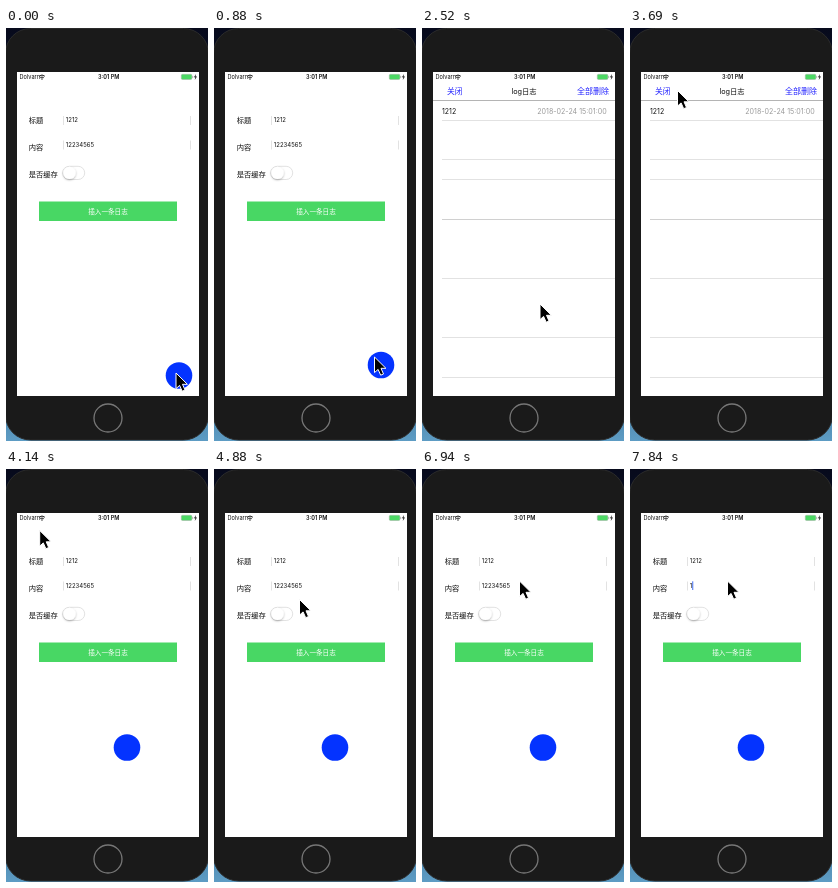
Write an HTML page that moves like this. It is 202x413 px and loops after 8000 ms.

```html
<!DOCTYPE html>
<html lang="zh">
<head>
<meta charset="utf-8">
<style>
  html, body { margin: 0; height: 100%; overflow: hidden; background: #1a1a1a; }
  svg { display: block; width: 202px; height: 413px; }
  text { font-family: Inter, "Noto Sans CJK SC", "Noto Sans CJK", sans-serif; fill: #111; }
  .status { font-size: 5.6px; }
  .label { font-size: 7.3px; }
  .value { font-size: 6px; }
  .link { fill: #2626ff; }
</style>
</head>
<body>
<svg viewBox="0 0 202 413">
  <defs>
    <linearGradient id="desk" x2="0" y2="1">
      <stop offset="0" stop-color="#070a1c"/>
      <stop offset=".6" stop-color="#14304c"/>
      <stop offset="1" stop-color="#5d9cc4"/>
    </linearGradient>
    <filter id="soft" x="-50%" y="-50%" width="200%" height="200%">
      <feDropShadow dx="0" dy="1" stdDeviation=".8" flood-opacity=".3"/>
    </filter>
  </defs>

  <!-- phone -->
  <rect width="202" height="413" fill="url(#desk)"/>
  <rect x="-.5" y=".5" width="203" height="411.5" rx="25" fill="#1a1a1a" stroke="#2b2b2b"/>
  <circle cx="102" cy="390" r="14" fill="none" stroke="#777" stroke-width="1.3"/>
  <rect x="11" y="44" width="182" height="324" fill="#fff"/>

  <!-- status bar -->
  <g class="status">
    <text x="13.5" y="51">Dolvarn</text>
    <g fill="none" stroke="#111" stroke-width="1">
      <path d="M33.2 48.2q2.8-2.4 5.6 0M34.3 49.7q1.7-1.4 3.4 0"/>
      <circle cx="36" cy="51" r=".3"/>
    </g>
    <text x="102.7" y="51" text-anchor="middle" font-weight="600">3:01 PM</text>
    <rect x="175.3" y="46.3" width="10.6" height="5.2" rx="1.3" fill="#4cd964" stroke="#a5b8a8" stroke-width=".6"/>
    <path d="M186.7 48v2" stroke="#999" stroke-width=".7"/>
    <path d="M190 46l-2 3.3h1.4l-.7 2.7 2.3-3.4h-1.5z" fill="#111"/>
  </g>

  <g id="form">
    <g class="label">
      <text x="22.7" y="95">标题</text>
      <text x="22.7" y="121.7">内容</text>
      <text x="22.7" y="148.6">是否缓存</text>
    </g>
    <path d="M57.5 88v9M184.5 88v9M57.5 112.5v9M184.5 112.5v9" stroke="#e2e2e2"/>
    <text class="value" x="59.8" y="94.2">1212</text>
    <text class="value" x="59.8" y="119" id="content"></text>
    <rect id="caret" y="112.3" width="1" height="8.7" fill="#3f6cf0"/>
    <rect x="56.7" y="138.3" width="22" height="13.2" rx="6.6" fill="#fff" stroke="#e2e2e2"/>
    <circle cx="63.5" cy="144.9" r="6.2" fill="#fff" filter="url(#soft)"/>
    <rect x="33" y="173.5" width="138" height="19.5" fill="#48d764"/>
    <text x="102" y="185.7" text-anchor="middle" font-size="6.6" style="fill:#fff">插入一条日志</text>
    <circle id="ball" r="13.3" fill="#0433ff"/>
  </g>

  <g id="log">
    <text class="link" x="25" y="65.8" font-size="7.8">关闭</text>
    <text x="102" y="65.6" text-anchor="middle" font-size="7.3">log日志</text>
    <text class="link" x="187" y="65.9" text-anchor="end" font-size="8">全部删除</text>
    <path d="M11 72.5h182" stroke="#b4b4b4"/>
    <text x="20" y="85.6" font-size="7">1212</text>
    <text x="184.7" y="85.6" text-anchor="end" font-size="7.1" style="fill:#999">2018-02-24 15:01:00</text>
    <path d="M20 92.5h173M20 131.5h173M20 151.5h173M20 250.5h173M20 309.5h173M20 349.5h173" stroke="#e2e2e2"/>
    <path d="M20 191.5h173" stroke="#d0d0d0"/>
  </g>

  <path id="pointer" d="M0 0V15.6L3.6 12.4 6.2 18.2 9 17 6.5 11.3H11.4Z" fill="#000" stroke="#fff" stroke-width="1"/>
</svg>
<script>
const LOOP = 8000, TICK = 148, LAST_TICK = 53;
const [form, content, caret, ball, log, pointer] =
  ['form', 'content', 'caret', 'ball', 'log', 'pointer'].map(id => document.getElementById(id));

// Paths as [tick, x, y]
const pointerPath = [
  [3, 170, 345], [5, 167, 341], [6, 160.5, 329], [7, 135, 296], [8, 118, 276],
  [20, 118, 276], [21, 112, 258], [24, 56, 70], [25, 47.5, 62.5], [27, 33.7, 61.5],
  [29, 33.7, 61.5], [33, 85.5, 130.5], [37, 85.5, 182], [39, 85.5, 182],
  [41, 95.5, 127.5], [45, 97.5, 112]
];
const ballPath = [
  [4, 173, 347.5], [6, 167, 337], [7, 146, 309], [8, 119.5, 276],
  [10, 119.5, 276], [12, 121, 278.5]
];
const caretSpans = [[1, 4], [8, 11], [14, 17], [35, 38], [41, 44], [47, 99]];

const clamp = (v, lo, hi) => Math.min(hi, Math.max(lo, v));
const within = (tick, [from, to]) => tick >= from && tick < to;
const show = (el, visible) => el.setAttribute('visibility', visible ? 'visible' : 'hidden');

function place(el, path, tick) {
  const next = path.findIndex(p => p[0] > tick);
  const b = path.at(next), a = next > 0 ? path[next - 1] : b;
  const u = a === b ? 0 : (tick - a[0]) / (b[0] - a[0]);
  const [x, y] = [1, 2].map(i => a[i] + (b[i] - a[i]) * u);
  el.setAttribute('transform', `translate(${x} ${y})`);
}

function draw(now) {
  const tick = Math.min(LAST_TICK, Math.floor((now % LOOP + 10) / TICK));
  const logOpen = within(tick, [17, 28]);
  show(form, !logOpen);
  show(log, logOpen);

  content.textContent = '12234565'.slice(0, 8 - clamp(tick - 46, 0, 7));
  caret.setAttribute('x', 59.8 + content.getComputedTextLength());
  show(caret, !logOpen && caretSpans.some(span => within(tick, span)));

  place(ball, ballPath, tick);
  place(pointer, pointerPath, tick);
  requestAnimationFrame(draw);
}
requestAnimationFrame(draw);
</script>
</body>
</html>
```
